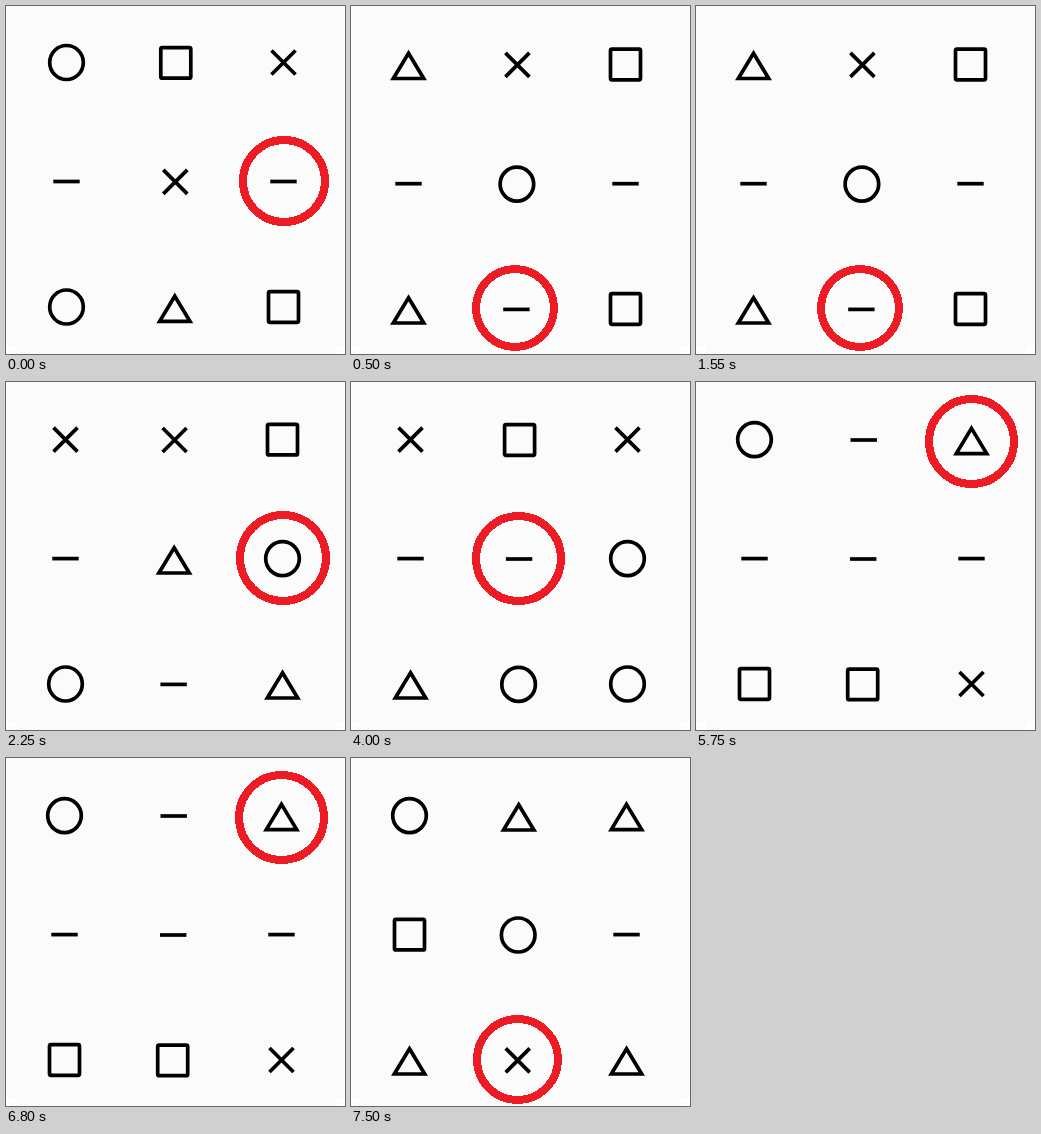
These frames come from a looping animation (339 by 348 pixels, 8000 ms). An HTML page:

```html
<!DOCTYPE html>
<html lang="en">
<meta charset="utf-8">
<title>Symbol grid</title>
<style>
  html, body { margin: 0; width: 100%; height: 100%; overflow: hidden; background: #fbfbfb; }
  svg { display: block; fill: none; }
  #grid { stroke: #000; stroke-width: 3.7; filter: blur(0.5px); }
  #ring { stroke: #ed1c24; stroke-width: 8; shape-rendering: crispEdges; }
</style>
<svg width="339" height="348">
  <defs>
    <ellipse id="o" rx="16.8" ry="17"/>
    <rect id="s" x="-15" y="-15.3" width="30" height="30.6" rx="1.5"/>
    <path id="x" d="M-12-12L12,12M12-12L-12,12"/>
    <path id="t" d="M0-11.2L15.2,14H-15.2Z"/>
    <path id="m" d="M-13.2,0H13.2"/>
  </defs>
  <path fill="#fff" d="M0,340h10v8h-10zM330,340h9v8h-9z"/>
  <g id="grid"></g>
  <circle id="ring"/>
</svg>
<script>
// start time, symbols row by row, column and row centres, ring centre and outer radius
const scenes = [
  { at: 0, symbols: 'osxmxmots', cols: [60.5, 169.3, 277.5], rows: [56.5, 175.5, 301], ring: [278, 175, 45] },
  { at: 500, symbols: 'txsmomtms', cols: [57.5, 165.9, 274.5], rows: [58.5, 177.7, 303], ring: [164, 302, 43] },
  { at: 2250, symbols: 'xxsmtoomt', cols: [59.5, 168.1, 276.5], rows: [57.6, 176.6, 302], ring: [277, 176, 47] },
  { at: 4000, symbols: 'xsxmmotoo', cols: [59.5, 168.1, 276.5], rows: [57.6, 176.6, 302], ring: [167.5, 176.5, 46.5] },
  { at: 5750, symbols: 'omtmmmssx', cols: [58.5, 167.2, 275.5], rows: [57.6, 176.6, 302], ring: [275.5, 59.5, 46.5] },
  { at: 7500, symbols: 'ottsomtxt', cols: [58.5, 167.2, 275.5], rows: [57.6, 176.6, 302], ring: [166.5, 301.5, 44.5] }
];

const grid = document.getElementById('grid');
const ring = document.getElementById('ring');

function place(symbol, i, { cols, rows }) {
  const col = i % 3, row = Math.floor(i / 3);
  // the middle column leans slightly and sits a little lower
  const lean = col === 1 ? 0.5 * (1 - row) : 0;
  const drop = col === 1 ? 0.4 : 0;
  return `<use href="#${symbol}" x="${cols[col] + lean}" y="${rows[row] + drop}"/>`;
}

function drawScene(scene) {
  grid.innerHTML = [...scene.symbols].map((symbol, i) => place(symbol, i, scene)).join('');
  const [x, y, radius] = scene.ring;
  ring.setAttribute('cx', x);
  ring.setAttribute('cy', y);
  ring.setAttribute('r', radius - 4);
}

const start = performance.now();
let shown;
function tick() {
  const time = (performance.now() - start) % 8000;
  const scene = scenes.findLast(({ at }) => time >= at);
  if (scene !== shown) drawScene(shown = scene);
  requestAnimationFrame(tick);
}
tick();
</script>
</html>
```
